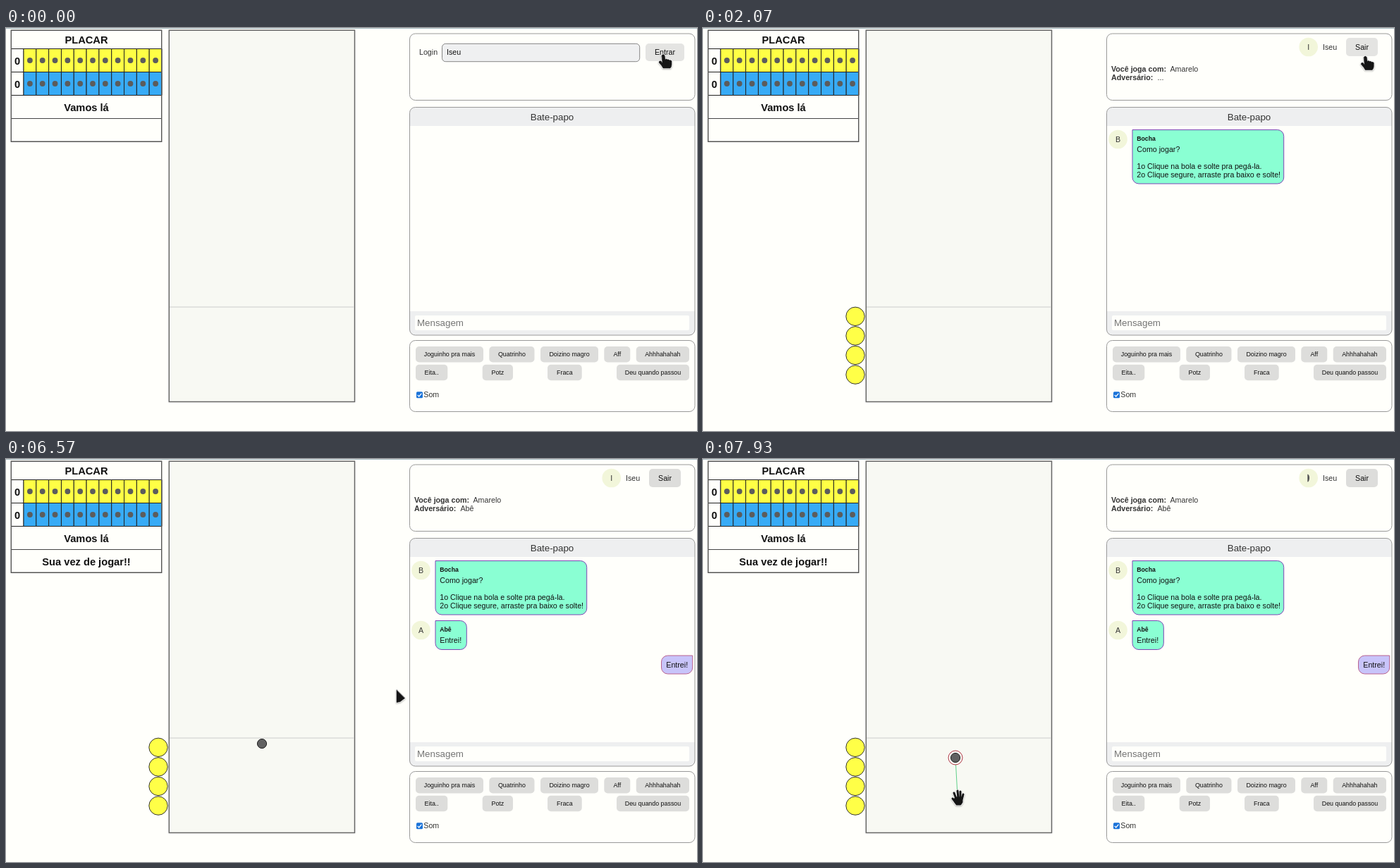
These frames come from a looping animation (980x572 px, 8 s). An HTML page with a canvas:

```html
<!DOCTYPE html>
<html lang="pt">
<head>
<meta charset="utf-8">
<title>Bocha</title>
<style>
html, body { margin: 0; width: 100%; height: 100%; overflow: hidden; background: #fffffb; }
canvas { display: block; }
</style>
</head>
<body>
<canvas id="stage" width="980" height="572"></canvas>
<script>
const ctx = document.getElementById('stage').getContext('2d');
const LOOP = 8000, STEP = 1000 / 14;
const PAPER = '#fffffb', INK = '#333', LINE = '#999', GREY = '#eeeff0', BUTTON = '#dddddb', HOVER = '#e4e4e2';
const LOGIN = 27, ALONE = 42, RETURN = 82, JOIN = 88, GREET = 92, GRAB = 101, PICK = 104, AIM = 107;
const player = 'Iseu', rival = 'Abê';

// Cursor moves: first step, last step, destination x, y
const moves = [
  [0, 0, 932, 38], [8, 10, 936, 39], [13, 14, 932, 35], [17, 18, 948, 47], [21, 21, 947, 46],
  [23, 23, 951, 48], [24, 24, 946, 45], [26, 26, 947, 42], [27, 27, 943, 42], [29, 30, 938, 40],
  [32, 33, 934, 37], [82, 82, 867, 49], [83, 83, 740, 68], [85, 86, 729, 70], [88, 88, 733, 70],
  [89, 90, 600, 262], [92, 92, 554, 328], [93, 96, 368, 396], [98, 98, 379, 410], [99, 99, 366, 392],
  [101, 103, 363, 412], [104, 105, 358, 424], [107, 111, 361, 479]
];

const arrow = new Path2D('M0 0V17.5L5 16.5L11.5 11.5Z');
const pointer = new Path2D('M-2 1Q0-2 2 1L3 7Q5 5 6 7Q8 6 9 8Q11 7 12 9V14Q12 17 10 19H0Q-2 15-6 11Q-6 8-3 9L-1 12Z');
const openHand = new Path2D('M-5-5L-2 3M0-8L1 3M4-7V3M8-3L6 5M-7 3L-3 8M-3 2H6L6 8L4 11H-1L-4 7Z');

function cursorAt(step) {
  let x = 0, y = 0;
  for (const [first, last, toX, toY] of moves) {
    if (step < first) break;
    const k = Math.min(1, (step - first + 1) / (last - first + 1));
    const eased = k * (2 - k);
    x += (toX - x) * eased;
    y += (toY - y) * eased;
  }
  return { x, y };
}

function paint(fill, stroke, width = 1) {
  if (fill) { ctx.fillStyle = fill; ctx.fill(); }
  if (stroke) { ctx.strokeStyle = stroke; ctx.lineWidth = width; ctx.stroke(); }
}

function box(left, top, right, bottom, radius, fill, stroke, width) {
  ctx.beginPath();
  ctx.roundRect(left, top, right - left, bottom - top, radius);
  paint(fill, stroke, width);
}

function disc(x, y, r, fill, stroke) {
  ctx.beginPath();
  ctx.arc(x, y, r, 0, 2 * Math.PI);
  paint(fill, stroke);
}

function line(x1, y1, x2, y2, color) {
  ctx.beginPath();
  ctx.moveTo(x1, y1);
  ctx.lineTo(x2, y2);
  paint(null, color);
}

// y is the middle of the capitals
function text(string, x, y, { size = 10.67, bold = false, align = 'left', color = INK } = {}) {
  ctx.font = `${bold ? 'bold ' : ''}${size}px "Liberation Sans", Arial, sans-serif`;
  ctx.textAlign = align;
  ctx.fillStyle = color;
  ctx.fillText(string, x, y + size * 0.35);
}

function button(label, left, top, right, bottom, size, fill = BUTTON) {
  box(left, top, right, bottom, 5, fill);
  text(label, (left + right) / 2, (top + bottom) / 2, { size, align: 'center', color: '#111' });
}

function avatar(letter, x, y) {
  disc(x, y, 13.3, '#f2f6da');
  text(letter, x, y, { align: 'center' });
}

function drawScoreboard(step) {
  const title = { size: 14.67, bold: true, align: 'center', color: '#111' };
  text('PLACAR', 114, 17, title);
  [['#ffff45', 29.5], ['#37abf6', 62.5]].forEach(([color, top]) => {
    box(7.5, top, 25, top + 33, 0, PAPER, '#222');
    text('0', 16, top + 17, title);
    const cell = 196 / 11;
    for (let i = 0; i < 11; i++) {
      const left = 25 + i * cell;
      box(left, top, left + cell, top + 33, 0, color, '#222');
      disc(left + cell / 2, top + 16.5, 3.9, '#5c5c5c');
    }
  });
  text('Vamos lá', 114, 112.5, title);
  line(7, 128.5, 221, 128.5, '#444');
  if (step >= JOIN) text('Sua vez de jogar!!', 114, 145.5, title);
  box(7.3, 3.3, 220.7, 161.3, 0, null, '#555', 1.4);
}

function drawBoard(step, cursor) {
  box(231.3, 3.3, 494.5, 530.5, 0, '#f8f9f3', '#666', 1.5);
  line(232, 396, 494, 396, '#ccc');
  if (step >= LOGIN)
    for (let i = 0; i < 4; i++) disc(216, 409.3 + i * 27.6, 13.2, '#ffff47', '#333');
  if (step < JOIN) return;
  const ball = step < PICK ? { x: 363, y: 404 } : cursorAt(Math.min(step, AIM - 1));
  if (step >= AIM) line(ball.x, ball.y, cursor.x, cursor.y, '#5fd08a');
  if (step >= PICK) disc(ball.x, ball.y, 10, '#f8f9f3', '#b23a48');
  disc(ball.x, ball.y, 6.6, '#616161', '#222');
}

function drawAccount(step) {
  box(572.5, 8, 977, 102.5, 8, null, LINE);
  if (step < LOGIN) {
    text('Login', 586, 34.5);
    box(618.5, 22.3, 898.7, 47.7, 5, '#eff0f1', '#858585');
    text(player, 625, 34.5, { color: '#111' });
    button('Entrar', 907, 22, 962, 47, 10.67, HOVER);
    return;
  }
  if (step < GRAB) avatar('I', 858.7, 27);
  else {
    disc(858.7, 27, 13.3, '#f2f6da');
    ctx.beginPath();
    ctx.ellipse(857.3, 27, 2.8, 5.5, 0, -Math.PI / 2, Math.PI / 2);
    paint('#555');
  }
  text(player, 879, 27);
  button('Sair', 912, 14, 957, 40, 10.67, step < ALONE ? HOVER : BUTTON);
  text('Você joga com:', 579, 58.5, { bold: true });
  text('Amarelo', 662.5, 58.5);
  text('Adversário:', 579, 70.5, { bold: true });
  text(step < JOIN ? '...' : rival, 644.5, 70.5);
}

function received(name, lines, top, right, bottom) {
  avatar(name[0], 588.5, top + 13.5);
  box(609, top, right, bottom, [0, 9, 9, 9], '#8affd3', '#7d45b5');
  text(name, 615.3, top + 12, { size: 8.67, bold: true, color: '#111' });
  lines.forEach((string, i) => text(string, 615.3, top + 28 + i * 12, { color: '#111' }));
}

function drawChat(step) {
  box(572.5, 112.5, 977, 139, [8, 8, 0, 0], GREY);
  box(572.5, 402, 977, 436, [0, 0, 8, 8], GREY);
  box(572.5, 112.5, 977, 436, 8, null, LINE);
  text('Bate-papo', 774.5, 126, { size: 13.33, align: 'center' });
  box(580, 408, 969, 429, 2, PAPER);
  text('Mensagem', 583, 418.5, { size: 13.33, color: '#757575' });
  if (step >= LOGIN)
    received('Bocha', ['Como jogar?', '', '1o Clique na bola e solte pra pegá-la.',
      '2o Clique segure, arraste pra baixo e solte!'], 144.5, 823.7, 221);
  if (step >= GREET) {
    received(rival, ['Entrei!'], 229.5, 653.3, 270.5);
    box(929.5, 279, 973.7, 305, [9, 0, 9, 9], '#c8c4fa', '#b9628f');
    text('Entrei!', 936.3, 292, { color: '#111' });
  }
}

function drawPhrases() {
  box(572.5, 443.5, 977, 544.5, 8, null, LINE);
  const rows = [
    [452, [['Joguinho pra mais', 581, 677], ['Quatrinho', 685.3, 749.5], ['Doizino magro', 758, 840],
      ['Aff', 848.3, 885.3], ['Ahhhahahah', 893.7, 969]]],
    [477.7, [['Eita..', 581, 626.3], ['Potz', 675.7, 719], ['Fraca', 768, 816.7], ['Deu quando passou', 866, 969]]]
  ];
  for (const [top, items] of rows)
    for (const [label, left, right] of items) button(label, left, top, right, top + 22.5, 8.89);
  box(582, 516.3, 591, 525.3, 1.5, '#1a73d9');
  ctx.beginPath();
  ctx.moveTo(583.7, 520.9);
  ctx.lineTo(585.7, 523);
  ctx.lineTo(589.4, 518.6);
  paint(null, '#fff', 1.3);
  text('Som', 592.3, 520.5);
}

function drawCursor(step, { x, y }) {
  if (step >= ALONE && step < RETURN) return;
  const shape = step < ALONE ? pointer : step < GRAB ? arrow : openHand;
  const weight = shape === openHand ? 3 : 0.6;
  ctx.save();
  ctx.translate(x, y);
  ctx.lineJoin = ctx.lineCap = 'round';
  ctx.shadowColor = 'rgba(0,0,0,.3)';
  ctx.shadowBlur = 2;
  ctx.shadowOffsetY = 1;
  ctx.strokeStyle = '#fff';
  ctx.lineWidth = weight + 1.6;
  ctx.stroke(shape);
  ctx.shadowColor = 'transparent';
  ctx.strokeStyle = ctx.fillStyle = '#151515';
  ctx.lineWidth = weight;
  ctx.fill(shape);
  ctx.stroke(shape);
  ctx.restore();
}

function render(now) {
  // The screen refreshes 14 times per second
  const step = Math.floor((now % LOOP) / STEP + 0.1) % 112;
  const cursor = cursorAt(step);
  ctx.fillStyle = PAPER;
  ctx.fillRect(0, 0, 980, 572);
  line(0, 0.5, 980, 0.5, '#a9bcc2');
  drawScoreboard(step);
  drawBoard(step, cursor);
  drawAccount(step);
  drawChat(step);
  drawPhrases();
  drawCursor(step, cursor);
}

let start;
function tick(now) {
  start ??= now;
  render(now - start);
  requestAnimationFrame(tick);
}
render(0);
requestAnimationFrame(tick);
</script>
</body>
</html>
```
